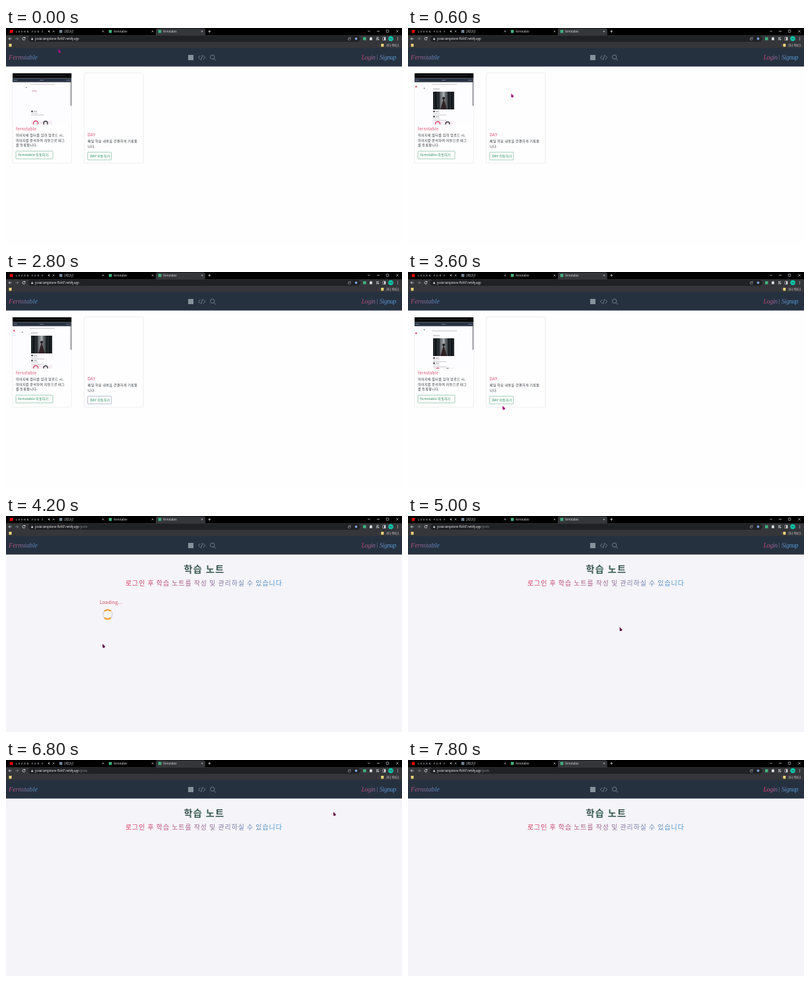
An HTML page with a canvas for the animation above (8000 ms loop, 600 by 329 pixels).

```html
<!DOCTYPE html>
<html lang="ko">
<head>
<meta charset="utf-8">
<title>학습 노트</title>
<style>
html, body { margin: 0; width: 100%; height: 100%; overflow: hidden; background: #fefefe; }
canvas { display: block; width: 600px; height: 329px; }
</style>
</head>
<body>
<canvas id="stage"></canvas>
<script>
const W = 600, H = 329, LOOP = 8000, STEP = 200;
const POST_LOADED = 400, SCROLLED = 3400, PAGE_CHANGE = 4000, LOADED = 5000;
const HEADER_TOP = 30.6, HEADER_END = 58.5;
const SANS = '"Noto Sans CJK KR", "Noto Sans CJK", "Noto Sans", sans-serif';
const SCRIPT = '"Liberation Serif", serif';
const LIGHT = '#dddfe2', PINK = '#d64067', INK = '#30343a', GREEN = '#3fb27f';

const canvas = document.getElementById('stage');
const ctx = canvas.getContext('2d');
const dpr = window.devicePixelRatio || 1;
canvas.width = W * dpr;
canvas.height = H * dpr;

// Pointer stops: time, x, y
const stops = [
  [0, 81, 35], [1200, 235, 171], [2400, 142, 195], [2800, 142, 195],
  [3200, 146, 311], [3600, 145, 207], [4200, 148, 198], [5200, 366, 166],
  [6000, 436, 132], [7400, 544, 45]
];

function pointerAt(t) {
  const next = stops.findIndex(s => s[0] > t);
  const [t1, x1, y1] = stops.at(next);
  if (next < 0) return { x: x1, y: y1 };
  const [t0, x0, y0] = stops[next - 1];
  const k = (t - t0) / (t1 - t0);
  return { x: x0 + (x1 - x0) * k, y: y0 + (y1 - y0) * k };
}

const inside = (p, x, y, w, h) => p.x >= x && p.x <= x + w && p.y >= y && p.y <= y + h;

function rect(x, y, w, h, color) {
  ctx.fillStyle = color;
  ctx.fillRect(x, y, w, h);
}

function box(x, y, w, h, r, fill, stroke) {
  ctx.beginPath();
  ctx.roundRect(x, y, w, h, r);
  if (fill) { ctx.fillStyle = fill; ctx.fill(); }
  if (stroke) { ctx.strokeStyle = stroke; ctx.lineWidth = 0.6; ctx.stroke(); }
}

function dot(x, y, r, color) {
  ctx.beginPath();
  ctx.arc(x, y, r, 0, Math.PI * 2);
  ctx.fillStyle = color;
  ctx.fill();
}

function arc(x, y, r, from, to, color, width = 0.8) {
  ctx.beginPath();
  ctx.arc(x, y, r, from, to);
  ctx.strokeStyle = color;
  ctx.lineWidth = width;
  ctx.stroke();
}

const ring = (x, y, r, color, width) => arc(x, y, r, 0, Math.PI * 2, color, width);

function line(x0, y0, x1, y1, color = LIGHT, width = 0.8) {
  ctx.beginPath();
  ctx.moveTo(x0, y0);
  ctx.lineTo(x1, y1);
  ctx.strokeStyle = color;
  ctx.lineWidth = width;
  ctx.stroke();
}

function cross(x, y, r) {
  line(x - r, y - r, x + r, y + r, LIGHT, 0.6);
  line(x + r, y - r, x - r, y + r, LIGHT, 0.6);
}

// Angle bracket with its tip at x, opening away from dir
function chevron(x, y, r, dir, color) {
  line(x, y, x - dir * r, y - r, color);
  line(x, y, x - dir * r, y + r, color);
}

function arrow(x, y, dir, color) {
  line(x - dir * 2.2, y, x + dir * 2.2, y, color);
  chevron(x + dir * 2.2, y, 2, dir, color);
}

function text(str, x, y, size, color, { weight = 400, space = 0, family = SANS, italic = false } = {}) {
  ctx.font = `${italic ? 'italic ' : ''}${weight} ${size}px ${family}`;
  ctx.letterSpacing = space + 'px';
  ctx.textBaseline = 'middle';
  ctx.fillStyle = color;
  ctx.fillText(str, x, y);
}

function blend(x0, x1, ...colors) {
  const g = ctx.createLinearGradient(x0, 0, x1, 0);
  colors.forEach((c, i) => g.addColorStop(i / (colors.length - 1), c));
  return g;
}

function drawTabs() {
  rect(0, 0, W, 11, '#000');
  box(227, 0.5, 75, 11, [3, 3, 0, 0], '#35363a');
  const tabs = [['', '#f00000'], ['2022년', '#71879b'], ['fernstable', GREEN], ['fernstable', GREEN]];
  tabs.forEach(([title, color], i) => {
    const x = 5.8 + i * 75;
    rect(x, 3, 4.5, 4.5, color);
    text(title, x + 7.4, 5.2, 4.4, LIGHT);
    cross(x + 66.3, 5.2, 1.3);
  });
  text('LEARN FOR F', 15, 5.2, 4, LIGHT, { space: 1.75 });
  rect(64, 4.4, 1.4, 1.6, LIGHT);
  chevron(64.6, 5.2, 1.8, -1, LIGHT);

  line(306.3, 5.2, 310.3, 5.2);
  line(308.3, 3.2, 308.3, 7.2);
  line(550, 5.7, 548.4, 4.1);
  line(550, 5.7, 551.6, 4.1);
  line(562, 5, 566, 5);
  box(576.3, 3.2, 3.4, 3.4, 0, null, LIGHT);
  cross(593, 5, 1.8);
}

function drawToolbar(onPosts) {
  const y = 16.3;
  rect(0, 11, W, 20, '#35363a');
  box(33.5, y - 4.5, 503, 9.2, 4.6, '#202124');

  arrow(6.3, y, -1, LIGHT);
  arrow(16.5, y, 1, '#85868a');
  arc(27, y, 2, 0.3, 5.5, LIGHT);
  rect(27.6, y - 2.3, 1.7, 1.7, LIGHT);

  rect(38.4, y - 0.2, 2.4, 2, LIGHT);
  arc(39.6, y - 0.2, 0.8, Math.PI, 0, LIGHT, 0.5);
  text('jovial-lampstone-f5cfd7.netlify.app', 44, y, 4.4, '#f0f0f0', { space: -0.15 });
  if (onPosts) text('/posts', 111, y, 4.4, '#888b90', { space: -0.1 });

  box(518.5, y - 1.3, 3.4, 3.2, 0.3, null, '#aaa');
  line(520, y, 522.5, y - 2.5, '#aaa');
  ctx.beginPath();
  for (let i = 0; i < 10; i++) {
    const a = (i / 5 - 0.5) * Math.PI, r = i % 2 ? 1.2 : 2.6;
    ctx.lineTo(530.5 + Math.cos(a) * r, y + Math.sin(a) * r);
  }
  ctx.fillStyle = '#8ab4f8';
  ctx.fill();

  rect(541, y - 2.2, 4.5, 4.5, GREEN);
  box(551, y - 1.5, 3.8, 3.6, 0.5, LIGHT);
  dot(553, y - 1.5, 1, LIGHT);
  box(571, y - 2.2, 4, 4.5, 0.3, null, LIGHT);
  rect(573, y - 2.2, 2, 4.5, LIGHT);
  dot(583, y, 3.8, '#08c5a9');
  rect(581, y - 0.4, 4, 0.8, '#075e55');
  for (const row of [-1, 0, 1]) {
    line(561, y + row * 1.6, 564 - row, y + row * 1.6);
    dot(593.5, y + row * 1.8, 0.55, LIGHT);
  }
  dot(564.5, y + 1.3, 0.9, LIGHT);

  for (const x of [4.5, 568.3]) box(x, 24, 4, 4.5, 0.5, '#f5d777');
  rect(565, 24, 0.5, 5, '#55575b');
  text('기타 북마크', 575.5, 26.2, 4.2, LIGHT);
}

function drawHeader(loginHover) {
  const y = 45, gray = '#87919c';
  rect(0, HEADER_TOP, W, HEADER_END - HEADER_TOP, '#263140');
  const script = { family: SCRIPT, italic: true, space: -0.1 };
  text('Fernstable', 4, y, 10.3, blend(4, 48, '#b84a6c', '#7d6c99', '#4e8fc3'), script);

  rect(276, y - 4, 8, 8, gray);
  chevron(291.5, y, 3, -1, gray);
  chevron(301.8, y, 3, 1, gray);
  line(297.8, y - 4, 295.6, y + 4, gray);
  ring(312.7, y - 0.7, 3.2, gray);
  line(315, y + 1.6, 318, y + 4.5, gray);

  script.space = -0.35;
  text('Login', 538.5, y, 9.8, blend(539, 561, loginHover ? '#f03a70' : '#bd476b', '#7b6c9d'), script);
  rect(562, y - 4, 0.5, 8, '#7180aa');
  text('Signup', 566, y, 9.8, blend(566, 592, '#6586b8', '#4b9bd4'), script);
}

// Dark alley with light at its centre and a plain figure
function photo(x, y) {
  const w = 32, h = 27;
  for (let i = 0; i < w; i++) {
    const light = Math.exp(-(((i - 15) / 5) ** 2));
    const shade = 28 + 14 * Math.sin(i * 1.3) + 135 * light;
    rect(x + i, y, 1, h, `rgb(${shade - 4}, ${shade + 2}, ${shade + 5})`);
  }
  dot(x + 16, y + 10, 2, '#1a1719');
  ctx.beginPath();
  ctx.moveTo(x + 16, y + 10);
  ctx.lineTo(x + 21, y + h);
  ctx.lineTo(x + 11, y + h);
  ctx.fillStyle = '#302225';
  ctx.fill();
}

// White picture with looping marks
function sketch(x, y) {
  rect(x, y, 32, 12, '#f7edf2');
  ring(x + 7, y + 4, 3.5, PINK, 1.3);
  ring(x + 22, y + 4, 3, '#34333d', 1.3);
}

function caption(x, y) {
  dot(x + 1.5, y, 1.3, '#333');
  rect(x + 4, y - 0.4, 5, 0.8, '#777');
  for (const row of [1, 2]) rect(x, y + row * 2.6, row * 10, 0.6, '#aaa');
}

function drawThumb(t) {
  const x = 38;
  ctx.save();
  ctx.beginPath();
  ctx.rect(10, 69, 89.2, 78);
  ctx.clip();
  rect(10, 69, 90, 78, '#fdfcfe');
  rect(10, 69, 90, 7.5, '#080808');
  rect(15, 71.3, 75, 1, '#242529');
  rect(10, 76.5, 90, 6, '#273241');
  for (const nav of [11, 51, 91]) rect(nav, 79, 6, 0.9, '#75789a');

  if (t < POST_LOADED) {
    rect(36, 85.5, 38, 0.7, '#b5b0c4');
    rect(30, 90, 1.2, 1.2, '#555');
    text('Loading...', 39, 96, 2, '#c65572');
    caption(x, 127);
    sketch(x, 141);
  } else {
    const shift = t >= SCROLLED ? 4 : 0;
    rect(36, 85.5 + shift, 38, 0.7, '#aaa7b6');
    rect(x, 92.5 + shift, 10, 0.8, '#999');
    photo(x, 97 + shift);
    caption(x, 127 + shift);
    caption(x, 135 + shift);
    sketch(x, 142 + shift);
    rect(11, 88 + shift, 2.6, 2.6, '#e46a78');
    rect(24, 91 - shift, 1.2, 1.6, '#666');
  }
  rect(98, 76.5, 1.2, 42, '#5a5c62');
  ctx.restore();
}

function button(label, x, y, w, hover) {
  box(x, y, w, 11.7, 1, '#fefefe', hover ? '#7f93ac' : '#68ad8c');
  text(label, x + 3.8, y + 5.9, 5.1, '#198754', { space: 0.12 });
}

function drawCard(x, titleY, title, body) {
  box(x, 68.5, 89.7, 137.5, 1.5, '#fefefe', '#e2e3e6');
  text(title, x + 5.3, titleY, 5.9, PINK, { weight: 300, space: 0.4 });
  body.forEach((s, i) => text(s, x + 5.3, titleY + 9.5 + i * 7.6, 5.1, INK, { space: 0.3 }));
}

function drawCards(t, linkHover) {
  rect(0, HEADER_END, W, H - HEADER_END, '#fefefe');
  drawCard(9.6, 153.8, 'fernstable',
    ['이미지에 필터를 입혀 업로드 시,', '이미지를 분석하여 자동으로 태그', '를 등록합니다.']);
  drawThumb(t);
  button('fernstable 이동하기', 15, 187.6, 56, false);
  drawCard(118.4, 162.8, 'DAY', ['매일 학습 내용을 간편하게 기록합', '니다.']);
  button('DAY 이동하기', 123.7, 189.2, 36, linkHover);
}

function drawPosts(t) {
  rect(0, HEADER_END, W, H - HEADER_END, '#f5f4f8');
  text('학습 노트', 269.5, 81, 14.2, blend(270, 331, '#39534e', '#315c4e', '#39534e'), { weight: 700, space: 1.3 });
  text('로그인 후 학습 노트를 작성 및 관리하실 수 있습니다', 181, 102.7, 10,
    blend(181, 419, '#de365f', '#9b6e93', '#419bd9'), { weight: 300, space: 0.92 });
  if (t >= LOADED) return;

  text('Loading...', 142, 131.5, 7.2, '#cf5068', { weight: 300, space: 0.1 });
  ring(154, 150, 7, '#dedee4', 2);
  const turn = (t - 4200) / 2000 * Math.PI * 2;
  for (const side of [0.25, 1.25]) {
    const from = turn + side * Math.PI;
    arc(154, 150, 7, from, from + Math.PI / 2, '#f0992b', 2);
  }
}

function drawPointer({ x, y }, fill) {
  const left = x - 1.7, top = y - 3.2;
  ctx.beginPath();
  ctx.moveTo(left, top);
  ctx.lineTo(left, top + 5.5);
  ctx.lineTo(left + 2.4, top + 6.2);
  ctx.lineTo(left + 4, top + 4);
  ctx.closePath();
  ctx.fillStyle = fill;
  ctx.fill();
}

function draw(t) {
  ctx.setTransform(dpr, 0, 0, dpr, 0, 0);
  const onPosts = t >= PAGE_CHANGE;
  const pointer = pointerAt(t);
  const loginHover = inside(pointer, 538, 39, 23, 12);
  const linkHover = !onPosts && inside(pointer, 123.7, 189, 36, 12);

  drawTabs();
  drawToolbar(onPosts);
  if (onPosts) drawPosts(t);
  else drawCards(t, linkHover);
  drawHeader(loginHover);
  if (!loginHover && !linkHover) drawPointer(pointer, onPosts ? '#5d0b45' : '#a80c82');
}

const start = performance.now();
function frame() {
  const t = (performance.now() - start) % LOOP;
  draw(Math.floor(t / STEP) * STEP);
  requestAnimationFrame(frame);
}
frame();
</script>
</body>
</html>
```
